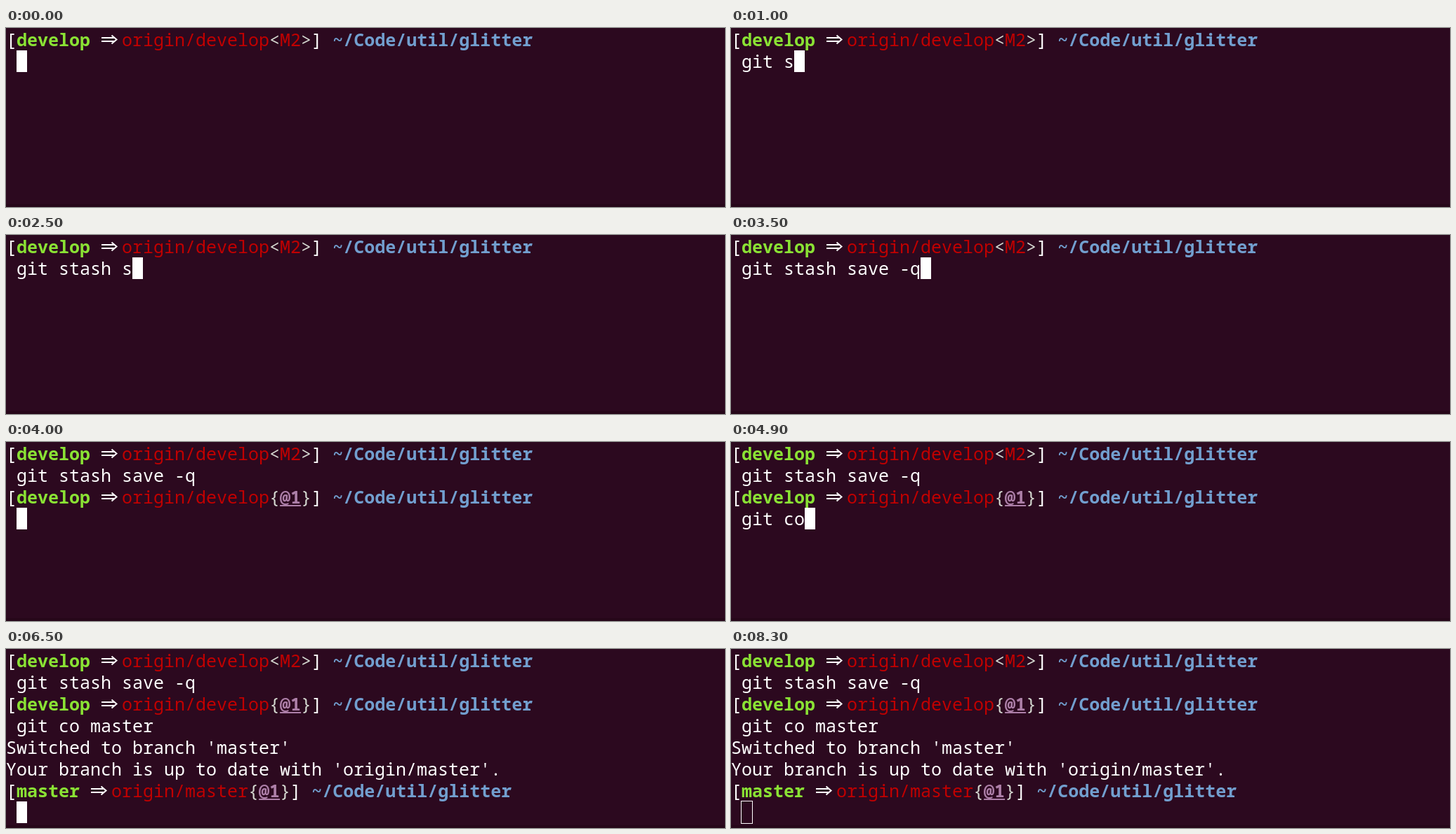
An HTML page for the animation above (8.4 s loop, 1024 px wide and 256 px high).

```html
<!DOCTYPE html>
<html lang="en">
<head>
<meta charset="utf-8">
<title>Terminal session</title>
<style>
html, body { margin: 0; width: 100%; height: 100%; overflow: hidden; background: #2c091f; }
#term {
  position: relative; width: 1024px; height: 256px; overflow: hidden;
  background: linear-gradient(#2c091f 252px, #260719 252px);
  color: #fff; font: 25px/31px "Noto Sans Mono", "DejaVu Sans Mono", monospace;
  font-variant-ligatures: none;
}
.row { position: absolute; left: 0; height: 31px; white-space: pre; }
.branch { color: #8ae234; font-weight: bold; }
.remote { color: #c00000; }
.dim { color: #d3d7cf; }
.path { color: #729fcf; font-weight: bold; }
.stash {
  color: #ad7fa8; font-weight: bold;
  text-decoration: underline 2px; text-underline-offset: 2px; text-decoration-skip-ink: none;
}
.arrow { position: relative; }
.arrow svg { position: absolute; left: 0; top: 2px; fill: none; stroke: #fff; stroke-width: 2; }
#cursor { position: absolute; box-sizing: border-box; width: 15px; height: 31px; background: #fff; }
#cursor.off { visibility: hidden; }
#cursor.hollow { width: 17px; height: 33px; margin: -1px; background: none; border: 1px solid #fff; }
</style>
</head>
<body>
<div id="term"></div>
<script>
const LOOP = 8400, CELL = 15, LINE = 31, TOP = 1, KEY = 100;
const READY = 6500, IDLE = 6800, BLINK = 600, BLUR = 8300;

const span = (cls, text) => `<span class="${cls}">${text}</span>`;
const arrow = span('arrow', '  <svg width="30" height="31">' +
  '<path d="M1 13h18M1 18h18M15.500 9.500L22.500 15.500L15.500 21.500"/></svg>');
const modified = span('dim', '&lt;') + span('remote', 'M2') + span('dim', '&gt;');
const stashed = span('dim', '{') + span('stash', '@1') + span('dim', '}');
const prompt = (branch, state) =>
  '[' + span('branch', branch) + ' ' + arrow + span('remote', 'origin/' + branch) +
  state + '] ' + span('path', '~/Code/util/glitter');

const lines = [
  prompt('develop', modified),
  '',
  prompt('develop', stashed),
  '',
  "Switched to branch 'master'",
  "Your branch is up to date with 'origin/master'.",
  prompt('master', stashed),
  ''
];

// Each command line: its row, when it opens and closes, and bursts of keystrokes.
// Within a burst, parts split by "|" follow one another every KEY ms.
const commands = [
  { row: 1, open: 0, close: 3600, bursts: {
    400: 'gi', 600: 't ', 1000: 's|t|a', 1500: 's', 1800: 'h', 2000: ' ',
    2500: 's|a|ve', 3000: ' -', 3500: 'q' } },
  { row: 3, open: 4000, close: READY, bursts: {
    4400: 'gi|t', 4800: ' c|o', 5300: ' |m|as', 6000: 'ter ' } },
  { row: 7, open: READY, close: LOOP, bursts: {} }
];
// The shell's spelling of the third typed word pair.
commands[0].bursts[1500] = 's';

const typed = (cmd, t) => ' ' + Object.entries(cmd.bursts).map(([at, keys]) =>
  keys.split('|').filter((_, i) => +at + i * KEY <= t).join('')).join('');

function cursorStyle(t) {
  if (t >= BLUR) return 'hollow';
  if (t >= IDLE) return Math.floor((t - IDLE) / BLINK) % 2 ? '' : 'off';
  return t >= 4200 && t < 4400 ? 'off' : '';
}

const term = document.getElementById('term');
const add = props => term.appendChild(Object.assign(document.createElement('div'), props));
const cursor = add({ id: 'cursor' });
const rows = lines.map((html, i) => {
  const row = add({ className: 'row', innerHTML: html });
  row.style.top = TOP + i * LINE + 'px';
  return row;
});

function draw(t) {
  const cmd = commands.filter(c => c.open <= t).pop();
  const running = t >= cmd.close;
  const last = running ? cmd.row + 1 : cmd.row;
  const col = running ? 0 : typed(cmd, t).length;
  for (const c of commands) rows[c.row].textContent = typed(c, t);
  rows.forEach((el, i) => {
    el.style.visibility = i < last || (i === last && !running) ? 'visible' : 'hidden';
  });
  cursor.className = cursorStyle(t);
  cursor.style.left = col * CELL + 'px';
  cursor.style.top = TOP + last * LINE + 'px';
}

const start = performance.now();
function tick() {
  // The screen refreshes once per KEY.
  const t = (performance.now() - start) % LOOP;
  draw(Math.floor(t / KEY) * KEY);
  requestAnimationFrame(tick);
}
tick();
</script>
</body>
</html>
```
